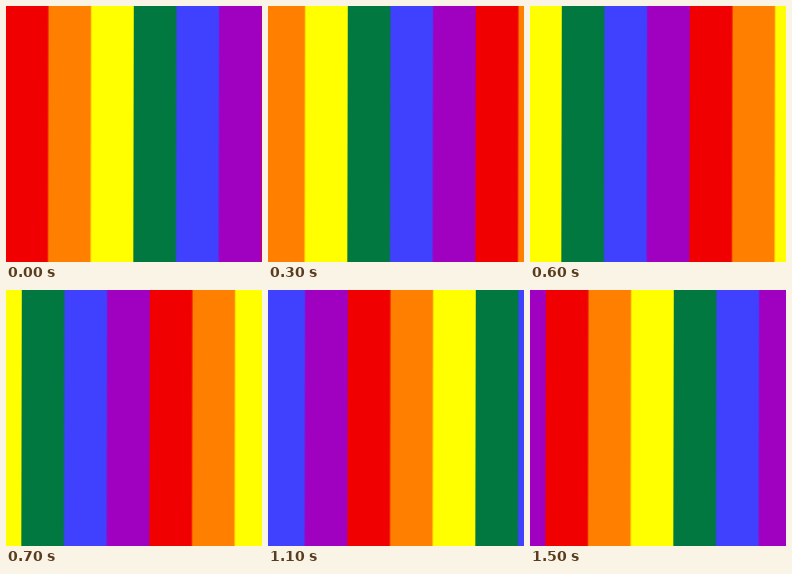
An HTML page for the animation above (1.6 s loop, 256x256 px).

```html
<!DOCTYPE html>
<html lang="en">
<head>
<meta charset="utf-8">
<title>Scrolling rainbow stripes</title>
<style>
  html, body {
    margin: 0;
    width: 100%;
    height: 100%;
    overflow: hidden;
  }

  svg { display: block; }

  .strip { animation: scroll 1600ms steps(16, end) infinite; }

  @keyframes scroll {
    to { transform: translateX(-256px); }
  }
</style>
</head>
<body>
<svg width="256" height="256" viewBox="0 0 256 256">
  <g class="strip">
    <!-- The stripes lean slightly; each is covered by the next, so no seams show. -->
    <g transform="translate(-0.2) skewX(-0.11)">
      <g id="flag">
        <rect width="256" height="256" fill="#f00000"/>
        <rect x="42.667" width="213.333" height="256" fill="#ff8000"/>
        <rect x="85.333" width="170.667" height="256" fill="#ffff00"/>
        <rect x="128" width="128" height="256" fill="#007840"/>
        <rect x="170.667" width="85.333" height="256" fill="#4040ff"/>
        <rect x="213.333" width="44" height="256" fill="#a000c0"/>
      </g>
      <use href="#flag" x="256"/>
    </g>
  </g>
</svg>
</body>
</html>
```
